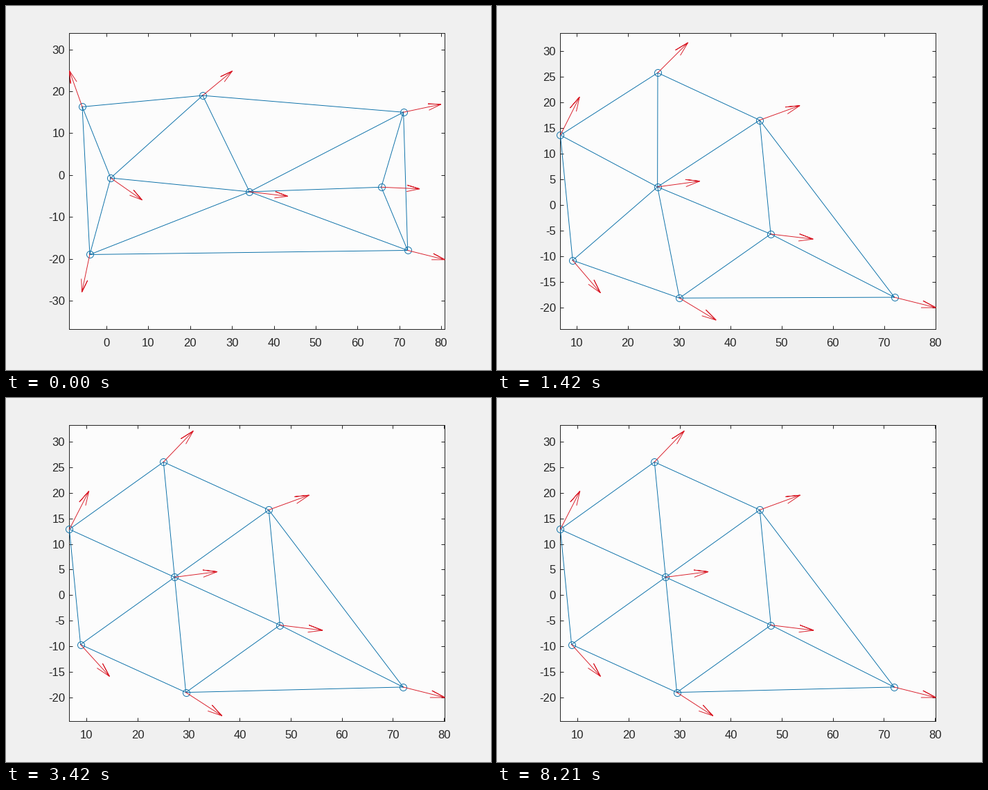
Animation of 700 by 525 pixels, one loop 8.33 s. Source, as a matplotlib script:

```python
import numpy as np
import matplotlib.pyplot as plt
from matplotlib.animation import FuncAnimation
from matplotlib.ticker import MultipleLocator
from matplotlib.tri import Triangulation

FRAMES, LOOP_MS = 200, 8330
DPI = 100
PX = 72 / DPI                      # one pixel in points
WIDTH, HEIGHT = 700, 525
LEFT, RIGHT, TOP, BOTTOM = 91.45, 633.45, 39.45, 466.45
BOX_W, BOX_H = RIGHT - LEFT, BOTTOM - TOP
BACK, PAPER, INK = "#f0f0f0", "#fcfcfc", "#262626"
BLUE, RED = "#0a70a8", "#d91e2a"

plt.rcParams.update({
    "font.family": "Liberation Sans",
    "font.size": 16.67 * PX,
    "axes.unicode_minus": False,
})

# Six agents settle into a ring around a middle one; the anchor never moves.
ANCHOR, MIDDLE = np.array([72, -18]), np.array([27.23, 3.51])
ANGLES = np.radians(35.55 + 60 * np.arange(6))
RING = MIDDLE + 22.66 * np.column_stack([np.cos(ANGLES), np.sin(ANGLES)])
RING_START = np.array([(71, 15), (23, 19), (-5.8, 16.3),
                       (-4, -19), (34.2, -4), (65.7, -2.9)])
MIDDLE_START = np.array([1, -0.7])

# The middle agent comes in from the left and parts the ring behind it.
PARTING = (np.sin(ANGLES) * (1 - np.cos(ANGLES)))[:, None] * np.column_stack(
    [np.sin(ANGLES), -np.cos(ANGLES)])


def decay(n, scale):
    return np.exp(-(n / scale) ** 1.3)


def positions(n):
    fast, slow = decay(n, 6), decay(n, 15)
    ring = RING + (RING_START - RING) * [fast, slow]
    ring += 14 * slow * (1 - slow) * PARTING
    middle = MIDDLE + (MIDDLE_START - MIDDLE) * [slow, fast]
    return np.vstack([ring, middle, ANCHOR])


def polylines(*points):
    """Join equal-length point arrays into separate lines split by NaN."""
    gap = np.full_like(points[0], np.nan)
    return np.stack([*points, gap], axis=1).reshape(-1, 2).T


def arrow_vectors(p):
    heading = p / np.linalg.norm(p, axis=1, keepdims=True)
    return heading * 0.3 * np.linalg.norm(np.ptp(p, axis=0)) / np.sqrt(len(p))


fig = plt.figure(figsize=(WIDTH / DPI, HEIGHT / DPI), dpi=DPI, facecolor=BACK)
ax = fig.add_axes([LEFT / WIDTH, 1 - BOTTOM / HEIGHT,
                   BOX_W / WIDTH, BOX_H / HEIGHT], facecolor=PAPER)
ax.tick_params(direction="in", top=True, right=True, length=5.4 * PX,
               width=PX, color=INK, labelcolor=INK)
ax.tick_params(axis="x", pad=12.8 * PX)
ax.tick_params(axis="y", pad=6.5 * PX)
for spine in ax.spines.values():
    spine.set(color=INK, linewidth=PX)
ax.xaxis.set_major_locator(MultipleLocator(10))

thin = dict(lw=0.95 * PX, clip_on=False, zorder=3)
mesh, = ax.plot([], [], color=BLUE, **thin)
dots, = ax.plot([], [], "o", ms=10 * PX, mfc="none", mec=BLUE,
                mew=0.95 * PX, clip_on=False, zorder=3)
arrows, = ax.plot([], [], color=RED, solid_joinstyle="miter", **thin)


def fit_view(points):
    """Tight in x, equal scale, centred in y."""
    low, high = points.min(axis=0), points.max(axis=0)
    scale = BOX_W / (high[0] - low[0])
    half = BOX_H / scale / 2
    centre = (low[1] + high[1]) / 2
    ax.set_xlim(low[0], high[0])
    ax.set_ylim(centre - half, centre + half)
    ax.yaxis.set_major_locator(MultipleLocator(5 if scale > 6.67 else 10))


def update(n):
    p = positions(n)
    v = arrow_vectors(p)
    side = 0.25 * np.column_stack([v[:, 1], -v[:, 0]])
    tip = p + v
    left, right = tip - 0.33 * (v + side), tip - 0.33 * (v - side)

    edges = Triangulation(*p.T).edges
    mesh.set_data(*polylines(p[edges[:, 0]], p[edges[:, 1]]))
    dots.set_data(*p.T)
    arrows.set_data(*polylines(p, tip, left, tip, right))
    fit_view(np.vstack([p, tip]))
    return mesh, dots, arrows


anim = FuncAnimation(fig, update, frames=FRAMES, interval=LOOP_MS / FRAMES,
                     init_func=lambda: update(0), repeat=True, repeat_delay=0)
plt.show()
```
